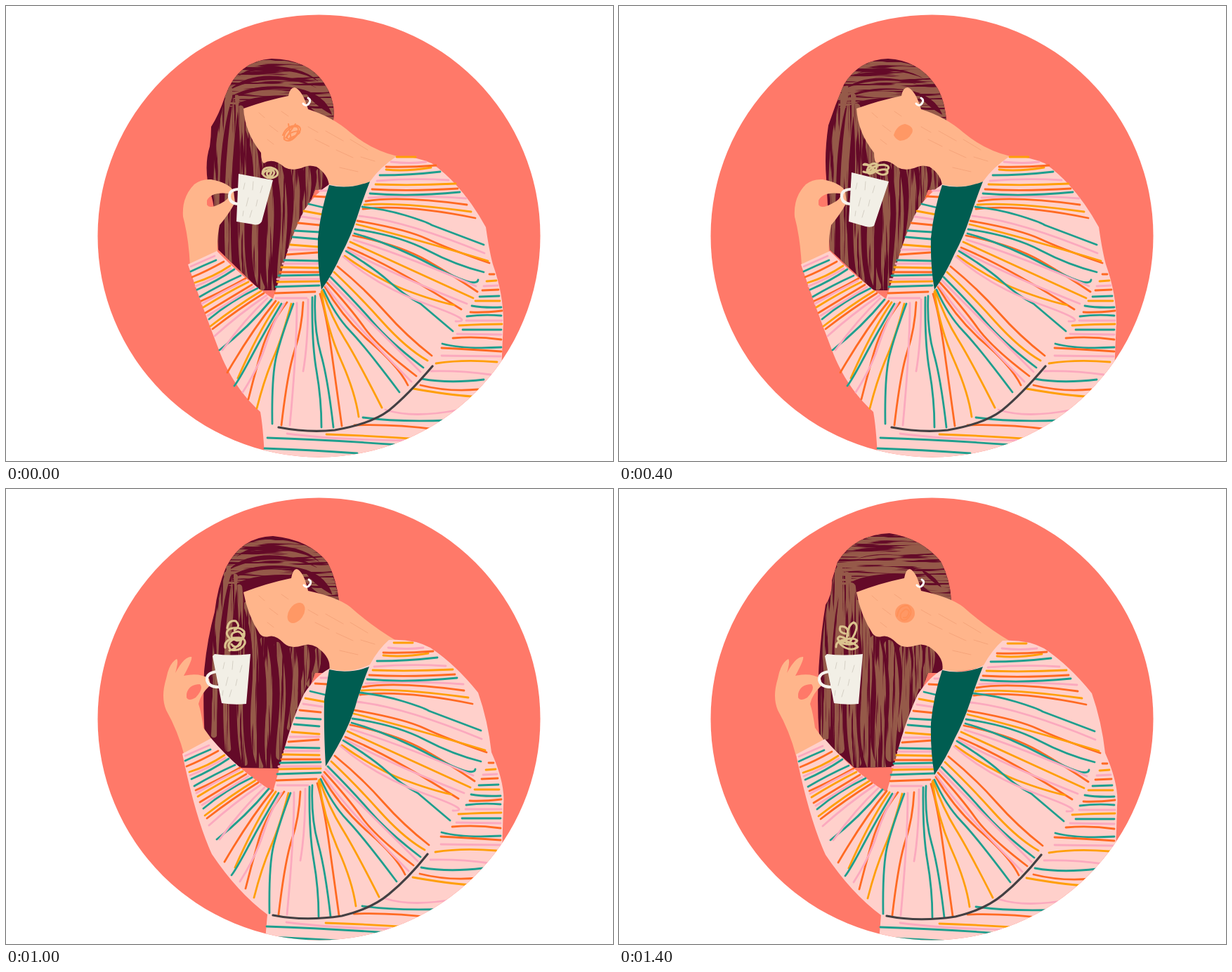
Animation of 864 by 648 pixels, one loop 1.6 s. Source, as an HTML page without scripts:

```html
<!DOCTYPE html>
<html lang="en">
<head>
<meta charset="utf-8">
<title>Coffee break</title>
<style>
html, body { margin: 0; width: 100%; height: 100%; overflow: hidden; background: #fff; }
svg { display: block; width: 100%; height: 100%; }
.pose { visibility: hidden; animation: show 1.6s calc(var(--i) * .2s - 1.6s) step-end infinite; }
@keyframes show { 0% { visibility: visible; } 12.5%, 100% { visibility: hidden; } }
.line { fill: none; stroke-linecap: round; stroke-linejoin: round; }
.stripes { stroke-width: 2.8; }
.t { stroke: #1f9f8e; }
.o { stroke: #ff6a22; }
.y { stroke: #ff9f08; }
.p { stroke: #fba9be; }
.skin { fill: #ffb58b; }
.cloth { fill: #ffd0cb; }
.green { fill: #005d51; }
.cup { fill: #f2efe6; }
.handle { stroke: #f7f4ee; stroke-width: 4; }
.steam { stroke: #dcc48f; stroke-width: 3; }
.blush { fill: #ff9865; }
.scrib { stroke: #ff9058; stroke-width: 2; }
.strand { stroke: #955a49; }
.dark { fill: #640a28; }
.grain { stroke: #f3a076; stroke-width: .8; }
.hem { stroke: #434043; stroke-width: 3.2; }
</style>
</head>
<body>
<svg viewBox="0 0 864 648">
<defs>
  <clipPath id="disc"><circle cx="445.5" cy="327.5" r="315"/></clipPath>

  <filter id="dryV" color-interpolation-filters="sRGB">
    <feTurbulence type="fractalNoise" baseFrequency=".3 .012" numOctaves="2" seed="4"/>
    <feColorMatrix values="0 0 0 0 0 0 0 0 0 0 0 0 0 0 0 0 0 0 10 -3.7"/>
    <feComposite in="SourceGraphic" operator="in"/>
  </filter>
  <filter id="dryH" color-interpolation-filters="sRGB">
    <feTurbulence type="fractalNoise" baseFrequency=".015 .3" numOctaves="2" seed="7"/>
    <feColorMatrix values="0 0 0 0 0 0 0 0 0 0 0 0 0 0 0 0 0 0 10 -3.7"/>
    <feComposite in="SourceGraphic" operator="in"/>
  </filter>

  <!-- hair -->
  <g id="crown" class="line strand" filter="url(#dryH)">
    <path d="M322 92Q350 66 400 74T462 118M316 106Q345 80 400 88T466 134M314 118Q350 96 405 102T470 150M320 130Q350 112 404 114M425 120Q440 140 470 154"/>
  </g>
  <g id="fall" class="line strand" filter="url(#dryV)">
    <path d="M318 115Q300 170 298 240T296 350M326 125Q316 190 314 260T316 370M332 140Q338 190 334 270T340 390M342 165Q360 215 354 290T362 395M366 215Q378 260 374 320T376 400M386 222Q398 270 392 330T390 380M408 228Q418 270 404 340M426 226Q434 260 412 310M444 230Q448 250 432 278"/>
  </g>
  <clipPath id="c0"><path d="M312 128Q330 78 378 75Q430 76 453 110Q470 136 466 162L470 262H440L383 405H362L302 347Q302 300 287 250Q283 222 290 200Q292 185 292 172Q303 155 312 128Z"/></clipPath>
  <clipPath id="c1"><path d="M320 112Q342 76 383 75Q425 77 450 112Q463 130 466 162L470 262H440L383 405H362L300 347Q298 300 295 245Q292 210 298 170Q308 140 320 112Z"/></clipPath>
  <clipPath id="c2"><path d="M312 112Q330 66 385 64Q430 72 455 100Q472 125 473 160L470 262H440L383 405H362L298 347Q297 300 287 250Q280 222 290 185Q298 140 312 112Z"/></clipPath>
  <clipPath id="c3"><path d="M313 112Q335 68 380 67Q432 72 458 105Q471 130 474 160L470 262H440L388 398L330 397L283 352Q280 310 282 260Q286 215 297 175Q301 140 313 112Z"/></clipPath>
  <clipPath id="c5"><path d="M311 104Q335 65 385 63Q430 70 458 103Q472 130 473 160L470 262H440L390 396L335 397L285 352Q281 300 285 245Q288 200 294 165Q304 150 303 130Z"/></clipPath>
  <g id="hair0" clip-path="url(#c0)" stroke-width="9"><rect class="dark" x="270" y="50" width="220" height="370"/><use href="#crown" y="9"/><use href="#fall" x="2" y="6"/></g>
  <g id="hair1" clip-path="url(#c1)" stroke-width="11"><rect class="dark" x="270" y="50" width="220" height="370"/><use href="#crown" x="-2" y="11"/><use href="#fall" x="6" y="4"/></g>
  <g id="hair2" clip-path="url(#c2)" stroke-width="14"><rect class="dark" x="270" y="50" width="220" height="370"/><use href="#crown" y="3"/><use href="#fall" x="1" y="4"/></g>
  <g id="hair3" clip-path="url(#c3)" stroke-width="8.5"><rect class="dark" x="270" y="50" width="220" height="370"/><use href="#crown" y="4"/><use href="#fall"/></g>
  <g id="hair5" clip-path="url(#c5)" stroke-width="14"><rect class="dark" x="270" y="50" width="220" height="370"/><use href="#crown"/><use href="#fall" x="-2"/></g>

  <!-- head and neck -->
  <path id="grain" class="line grain" d="M360 152l8 7M375 170l12 9M372 190l9 7M392 150l10 7M430 172l14 8M440 190l20 10M455 178l25 14M470 205l24 11M490 190l25 15M475 230l26 6M505 215l20 6"/>
  <path id="ring" class="line" stroke="#fff" stroke-width="3" d="M423 139q4 5 8 0t-1-8"/>
  <g id="faceA">
    <path class="skin" d="M338 146Q372 134 402 128Q404 116 411 116Q422 120 430 147Q465 158 490 180Q520 205 557 214L556 230L520 252Q490 262 460 257Q459 240 442 229Q432 226 425 229Q408 236 397 230Q380 215 367 224Q363 222 363 209Q340 180 338 146Z"/>
    <use href="#grain"/><use href="#ring"/>
  </g>
  <g id="faceB">
    <path class="skin" d="M338 147Q372 134 406 127Q408 114 414 114Q424 118 430 145Q472 154 490 168Q520 195 557 217V232L520 252Q490 262 460 259Q464 240 442 225Q432 219 422 223Q405 228 396 220Q384 207 374 210Q366 212 361 206Q344 180 338 147Z"/>
    <use href="#grain"/><use href="#ring" x="1" y="-2"/>
  </g>

  <!-- cheeks -->
  <path id="cheek0" class="line scrib" d="M394 184q5-14 20-14q10 4 0 14q-10 12-18 6q-2-10 12-18q12-2 6 10q-8 12-14 6q0-8 16-10q8 2-12 10M402 168l4 22M412 168l-14 20"/>
  <path id="cheek1" class="blush" d="M391 184Q395 170 407 168Q421 172 417 181Q411 192 400 192Q394 190 391 184Z"/>
  <ellipse id="cheek2" class="blush" rx="14.5" ry="10.5" transform="translate(411 179.500) rotate(-46)"/>
  <ellipse id="cheek3" class="blush" rx="16" ry="10.5" transform="translate(413 176.500) rotate(-56)"/>
  <path id="cheek4" class="line scrib" d="M395 179q2-14 16-10q12 8 2 20q-12 8-15-4q0-14 12-9q6 7-3 12q-8-2-4-9q8-10 11 2q-4 12-12 10"/>
  <g id="cheek5"><ellipse class="blush" cx="407" cy="177" rx="14" ry="13.500"/><path class="line scrib" stroke-width="1.500" d="M396 181q2-16 15-15q10 10-2 20q-10 3-8-8q8-12 12-3q-2 10-8 8"/></g>

  <!-- garment -->
  <g id="shoulder" class="line stripes">
    <path class="y" d="M556 215H583M541 233Q570 236 605 230M526 254Q580 256 640 253M510 283Q560 279 662 293"/>
    <path class="p" d="M548 222Q575 225 598 222M528 249Q580 245 630 248M516 273Q580 269 655 274M503 299Q570 306 681 352"/>
    <path class="o" d="M541 229Q575 230 612 227M521 261Q575 264 643 260M512 278Q560 270 656 283M508 289Q570 282 668 302"/>
    <path class="t" d="M532 241Q575 241 618 236M518 267Q575 272 646 265M507 286Q538 289 568 298T606 312L680 340"/>
  </g>
  <g id="panel" class="line stripes">
    <path class="t" d="M431 282L452 287M411 320L446 322M408 329L444 332M396 362L444 363M388 384L446 383M384 400L446 398"/>
    <path class="o" d="M438 271L455 272M416 309L446 312M400 354L443 351M390 379L445 379M383 409L440 407"/>
    <path class="y" d="M424 292L451 297M405 340L444 343M392 372L444 373M386 393L446 392"/>
    <path class="p" d="M446 263L457 263M421 300L448 304M402 347H444M394 367H444M386 389H446M384 416H428"/>
  </g>
  <g id="fan" class="line stripes">
    <path class="o" d="M500 306Q570 318 600 332T688 366M494 327Q560 340 600 363T671 407M487 344Q550 370 648 432M472 371Q510 402 540 436T606 498M457 394Q490 430 510 458T584 527M454 400Q480 445 520 480T572 540M447 410Q456 440 463 490T478 598M423 422Q421 460 411 490T392 597M400 422Q374 456 364 490T345 560M384 420Q350 462 315 522"/>
    <path class="y" d="M499 311Q570 328 686 363M490 336Q545 361 584 379T665 416M482 356Q530 390 570 405T638 426M467 379Q500 410 535 449T600 505M450 405Q464 445 482 474T535 572M449 407Q457 460 477 505T502 585M406 424Q394 470 381 500T357 573M388 422Q360 462 330 530"/>
    <path class="t" d="M497 318Q560 327 600 348T680 379M496 324Q550 339 610 371T672 390M484 349Q525 374 546 393T590 424L636 463M462 386Q496 420 522 450T594 515M452 404Q468 440 490 463T560 550M440 413Q438 460 448 495T466 600M436 415Q435 480 442 520T449 600M409 424Q392 470 385 498T379 595M392 424Q368 464 350 498T325 541M378 418Q345 458 304 490"/>
    <path class="p" d="M495 333Q570 356 669 399M486 347Q550 382 656 424M480 357Q530 400 600 425T640 449M459 390Q500 432 590 521M455 398Q488 446 577 535M430 418Q430 480 423 520M414 423Q414 490 404 597M396 424Q380 450 370 482T337 550M372 416Q340 446 308 490"/>
  </g>
  <g id="sleeve" class="line stripes">
    <path class="t" d="M263 378Q280 370 299 362M272 404Q300 392 325 375M276 414Q305 397 334 384M289 446Q320 420 358 402"/>
    <path class="o" d="M265 386Q285 378 310 364M278 420Q305 408 341 388M284 437Q315 418 350 397M294 460Q330 432 367 409"/>
    <path class="y" d="M269 394Q295 386 319 370M281 429Q315 408 345 393M291 456Q330 426 363 406"/>
    <path class="p" d="M263 371L297 356M270 399Q295 389 320 374M279 424Q310 406 340 391M287 441L353 400M297 470Q330 440 371 412"/>
  </g>
  <g id="skirt" class="line stripes">
    <path class="t" d="M674 414L702 413M663 427Q680 430 705 429M656 442Q680 439 705 441M650 461L705 461M621 481Q650 489 705 486M592 531Q630 538 680 532M508 586Q560 593 628 590M372 615Q460 618 560 625M368 630Q430 632 500 637"/>
    <path class="o" d="M688 382L695 382M678 405L701 404M661 436Q680 437 706 434M636 473Q670 470 705 475M620 487Q660 489 705 492M590 540Q630 550 672 546M496 597Q550 595 612 603"/>
    <path class="y" d="M684 392L698 391M668 420L703 420M645 455Q680 453 706 453M612 509Q650 503 699 507M580 545Q630 554 663 556M456 610Q520 612 590 617"/>
    <path class="p" d="M680 399L700 398M655 448L706 448M642 467L705 468M605 520Q650 519 690 525M540 575Q580 588 645 575M400 609Q470 618 575 619M620 498L704 499"/>
  </g>
  <path id="top" class="green" d="M460 255Q488 262 518 250Q508 275 500 300Q490 330 478 352Q465 382 449 404Q443 370 444 330Q448 290 460 255Z"/>
  <path id="topSlim" class="green" d="M460 257Q488 264 517 253Q508 275 500 300Q490 340 455 395Q452 340 453 300Z"/>
  <g id="bodyA">
    <path class="cloth" d="M259 368L300 349Q340 390 380 417L390 388Q404 330 425 290Q441 266 460 254Q490 262 518 250Q532 230 556 214Q580 213 606 224Q650 255 683 315Q688 350 693 368Q708 410 708 450L705 520L660 642H368Q366 600 362 578Q325 545 305 495Q280 430 259 368Z"/>
    <use href="#shoulder"/><use href="#panel"/><use href="#fan"/><use href="#sleeve"/><use href="#skirt"/>
    <path class="line hem" d="M388 600Q430 608 468 604Q520 595 545 576Q572 554 607 513"/>
  </g>
  <g id="bodyB">
    <path class="cloth" d="M251 377L292 355Q330 400 380 431L390 395Q404 335 424 292Q441 266 460 256Q490 264 518 250Q530 228 545 215Q580 213 604 226Q640 250 672 290Q686 330 691 375Q711 420 708 450L706 520L660 642H369L372 606Q330 575 293 520Q270 470 251 377Z"/>
    <use href="#shoulder" x="-4" y="4"/><use href="#panel" x="2" y="6"/><use href="#fan" x="-4" y="9"/><use href="#sleeve" x="-8" y="9"/><use href="#skirt" x="-1" y="8"/>
    <path class="line hem" d="M380 607Q425 616 478 608Q520 598 545 577Q572 555 600 520"/>
  </g>

  <!-- hands -->
  <path id="handA" class="skin" fill-rule="evenodd" d="M262 370Q260 330 252 300Q250 272 268 254Q278 246 292 247Q318 252 324 264L326 280Q316 298 304 312Q300 330 301 352ZM286 277Q292 264 317 267Q320 274 306 281Q290 290 286 283Z"/>
  <path id="handC" class="skin" fill-rule="evenodd" d="M260 370Q258 330 248 298Q248 268 266 246Q278 230 285 230Q286 235 278 249Q294 232 310 232Q313 236 295 245Q284 252 283 262Q300 256 318 265L326 280Q312 298 300 310Q297 330 299 350ZM283 283Q284 273 315 272Q317 278 300 288Q286 293 283 286Z"/>
  <path id="handB" class="skin" fill-rule="evenodd" d="M254 380Q245 345 228 315Q220 296 228 270Q232 248 243 242Q246 245 241 262Q254 238 264 239Q266 242 253 266Q275 261 289 270L291 279Q277 292 274 306Q278 318 281 340L294 358ZM257 292Q260 278 276 278Q282 284 270 297Q260 303 257 297Z"/>

  <!-- cups -->
  <path id="marks" class="line" stroke="#d5d0c5" stroke-width="1" d="M340 252l-2 9M352 250l-1 12M365 256l-3 10M345 273l-3 12M358 276l-2 9M338 292l-1 7M350 291l-3 10"/>
  <g id="cup0"><path class="line handle" d="M330 261Q317 262 318 272Q319 281 330 282"/><path class="cup" d="M331 239L380 248L364 307Q360 313 352 311L328 307Z"/><use href="#marks"/></g>
  <g id="cup1"><path class="line handle" d="M330 261Q317 262 318 272Q319 281 330 282"/><path class="cup" d="M332 237L385 250L364 313Q360 316 352 314L328 307Z"/><use href="#marks"/></g>
  <g id="cup3"><path class="line handle" d="M300 260Q285 262 286 272Q288 282 303 282"/><path class="cup" d="M297 235Q320 238 348 235L342 306Q325 308 307 305L294 238Z"/><use href="#marks" x="-29" y="-5"/></g>

  <!-- steam -->
  <path id="steam0" class="line steam" d="M365 239q0-10 12-9q12 3 9 11q-6 6-15 3q-9-4-2-9q10-5 13 2q-2 8-9 5q-4-4 1-7q6 0 2 5"/>
  <path id="steam1" class="line steam" d="M348 236q10 4 14-4q-4-6-14-6q4-4 16 8q10 10 18 4q2-8-12-4q-16 4-17 0q4-12 14-9q2 4-4 12q-8 4-10-1q10-10 24-10q10 2 5 7"/>
  <path id="steam2" class="line steam" d="M366 230q-18 2-16-7q10-4 16 7q-12-10-1-14q10 2 1 14q4-14 15-9q2 11-15 9q18-2 15 8q-10 8-15-8q4 10-3 13q-10-4 3-13"/>
  <path id="steam3" class="line steam" d="M312 226q-2-10 12-14q18-2 16 8q-6 12-20 9q-8-8 4-15q14-2 9 8q-8 6-12-1M318 212q-8-8 1-13q14-4 20 4q2 12-10 13q-12-4-6-11q10-5 13 3M315 198q2-12 12-10q8 8-2 13M318 230q16-4 20-24"/>
  <path id="steam4" class="line steam" d="M312 225q-4-12 10-15q14 4 13 13q-6 10-14 1q0-10 12-16q12 0 8 12q-10 8-18-2q-4-12 6-20q14-4 12 8q-8 10-18 6M320 208q-4-10 6-12M312 218q8 16 22 8"/>
  <path id="steam5" class="line steam" d="M309 225q0-10 13-8q14 2 18 8q-8 6-18 1q-12-7-6-10q18-6 23 0q-6 8-20 4q-12-6-5-10q12 2 10 10q0-26 10-30q10 4-4 26M322 206q-10-2-7-10q12-2 11 13"/>
</defs>

<g clip-path="url(#disc)">
  <rect width="864" height="648" fill="#ff7969"/>
  <g class="pose" style="--i:0"><use href="#hair0"/><use href="#faceA"/><use href="#cheek0"/><use href="#handA"/><use href="#bodyA"/><use href="#top"/><use href="#cup0"/><use href="#steam0"/></g>
  <g class="pose" style="--i:1"><use href="#hair0"/><use href="#faceA"/><use href="#cheek1"/><use href="#handA"/><use href="#bodyA"/><use href="#top"/><use href="#cup0"/><use href="#steam1"/></g>
  <g class="pose" style="--i:2"><use href="#hair1"/><use href="#faceA"/><use href="#cheek1"/><use href="#handA" x="-2"/><use href="#bodyA"/><use href="#top"/><use href="#cup1" x="-1"/><use href="#steam1"/></g>
  <g class="pose" style="--i:3"><use href="#hair1" y="-3"/><use href="#faceA"/><use href="#cheek2"/><use href="#handA" x="-2"/><use href="#bodyA"/><use href="#top"/><use href="#cup1"/><use href="#steam2"/></g>
  <g class="pose" style="--i:4"><use href="#hair2"/><use href="#faceB"/><use href="#cheek2"/><use href="#handC"/><use href="#bodyA"/><use href="#top"/><use href="#cup1"/><use href="#steam2"/></g>
  <g class="pose" style="--i:5"><use href="#hair3"/><use href="#faceB"/><use href="#cheek3"/><use href="#handB"/><use href="#bodyB"/><use href="#topSlim"/><use href="#cup3"/><use href="#steam3"/></g>
  <g class="pose" style="--i:6"><use href="#hair3" y="1"/><use href="#faceB"/><use href="#cheek4"/><use href="#handB" x="-1"/><use href="#bodyB"/><use href="#top"/><use href="#cup3"/><use href="#steam4"/></g>
  <g class="pose" style="--i:7"><use href="#hair5"/><use href="#faceB"/><use href="#cheek5"/><use href="#handB" x="-2"/><use href="#bodyB" x="1" y="1"/><use href="#top" y="3"/><use href="#cup3" x="-1"/><use href="#steam5"/></g>
</g>
</svg>
</body>
</html>
```
